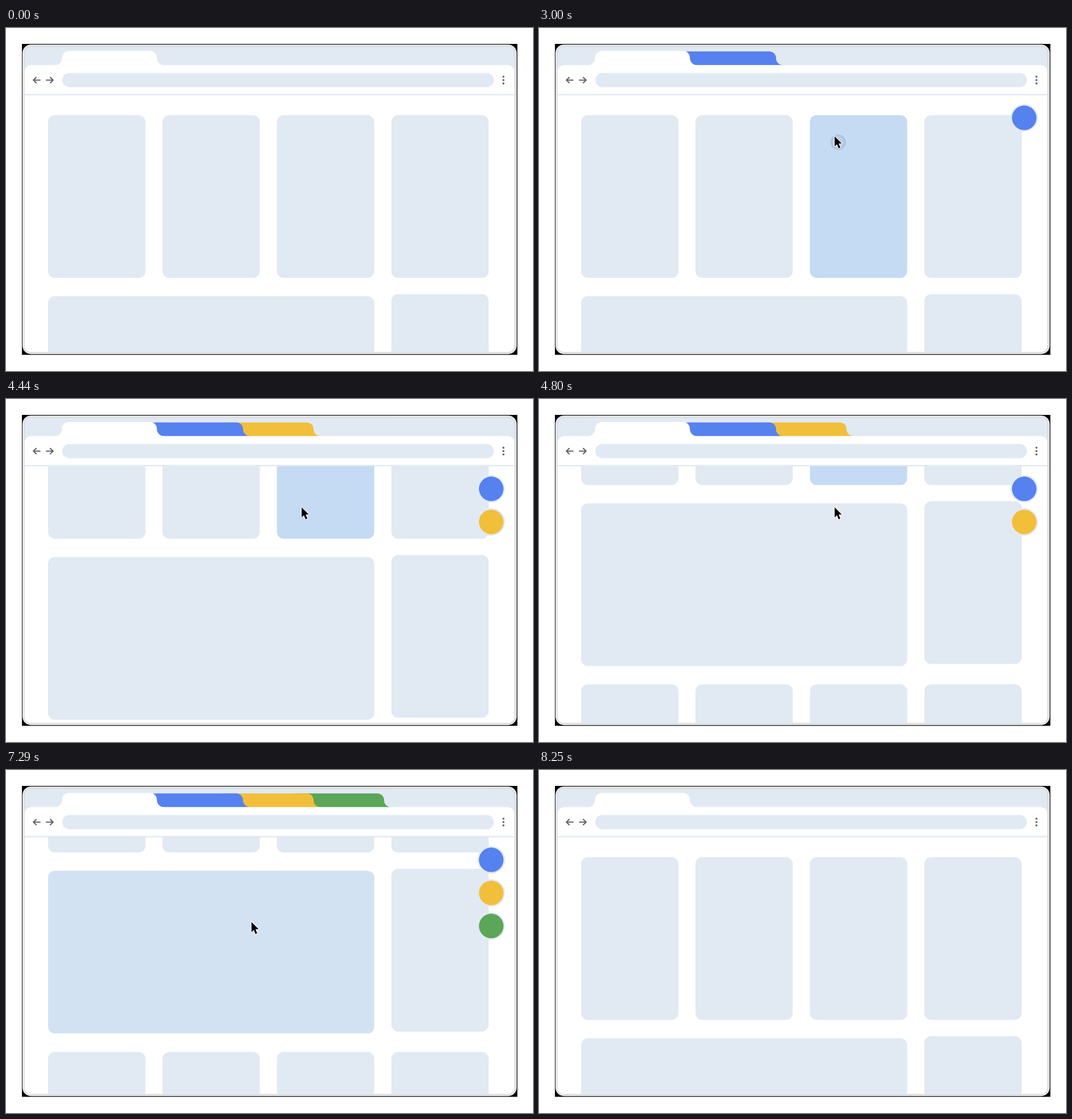
An HTML page with a canvas for the animation above (9 s loop, 927 px wide and 604 px high).

```html
<!DOCTYPE html>
<html lang="en">
<head>
<meta charset="utf-8">
<title>Browser tabs</title>
<style>
html, body { margin: 0; width: 100%; height: 100%; overflow: hidden; background: #fff; }
canvas { display: block; }
</style>
</head>
<body>
<canvas id="stage" width="927" height="604"></canvas>
<script>
const ctx = document.getElementById('stage').getContext('2d');
const LOOP = 9000, STEP = 30;
const PALE = '#e1e9f3', INK = '#5f6368';
const GREY = [225, 233, 243], ACTIVE = [197, 218, 243], SOFT = [211, 226, 243];
const SCROLL = 296.6;
const COLUMNS = [74, 275.2, 476.5, 677.8], CARD_W = 171.2, CARD_H = 286.5;

// click time, tab colour, right edge, hidden offset, tab and circle exit times
const tabs = [
  { click: 1110, color: '#5682ef', right: 417, travel: 152, y: 158.2, close: 7930, leave: 7650 },
  { click: 3000, color: '#f2bf3b', right: 541, travel: 124, y: 216.5, close: 7610, leave: 7470 },
  { click: 5730, color: '#5ba658', right: 665, travel: 124, y: 274.7, close: 7290, leave: 7290 }
];
const moves = [
  { start: 240, end: 900, from: [133, 77], to: [116.3, 179.3] },
  { start: 1890, end: 2700, from: [116.3, 179.3], to: [519.5, 190.3] },
  { start: 5070, end: 5590, from: [519.5, 190.3], to: [431.3, 267.3] }
];

const clamp = v => Math.max(0, Math.min(1, v));
const mix = (a, b, p) => a + (b - a) * p;
const span = (t, start, end) => clamp((t - start) / (end - start));
const blend = (a, b, p) => `rgb(${a.map((v, i) => Math.round(mix(v, b[i], p)))})`;

// cubic-bezier(.25, 0, .25, 1)
function ease(x) {
  let lo = 0, hi = 1;
  for (let i = 0; i < 24; i++) {
    const s = (lo + hi) / 2;
    if (0.75 * s * (1 - s) + s * s * s < x) lo = s; else hi = s;
  }
  return lo * lo * (3 - 2 * lo);
}
const glide = (t, start, end) => ease(span(t, start, end));

function box(x, y, w, h, r, color) {
  ctx.beginPath();
  ctx.roundRect(x, y, w, h, r);
  ctx.fillStyle = color;
  ctx.fill();
}

function disc(x, y, r, color) {
  ctx.beginPath();
  ctx.arc(x, y, r, 0, Math.PI * 2);
  ctx.fillStyle = color;
  ctx.fill();
}

function tabShape(left, right, top, r, color) {
  const base = 66, mid = top + r;
  ctx.beginPath();
  ctx.moveTo(left - r, base);
  ctx.lineTo(left - r, 65.3);
  ctx.arcTo(left, 65.3, left, mid, r);
  ctx.arcTo(left, top, left + r, top, r);
  ctx.arcTo(right, top, right, mid, r);
  ctx.arcTo(right, 65.3, right + r, 65.3, r);
  ctx.lineTo(right + r, base);
  ctx.fillStyle = color;
  ctx.fill();
}

function clipWindow() {
  ctx.beginPath();
  ctx.roundRect(32.6, 33.3, 861.6, 537.2, 11);
  ctx.clip();
}

function drawFrame() {
  ctx.fillStyle = '#fff';
  ctx.fillRect(0, 0, 927, 604);
  ctx.fillStyle = '#000';
  ctx.fillRect(28, 28, 871.5, 547.5);
  box(29, 29.2, 869.2, 545, 15, '#fff');
  box(30, 30.4, 867.2, 542.8, 14, '#dcdcdc');
}

function cardColors(t) {
  const first = t < 1110 ? 0 : 1 - span(t, 1710, 2010);
  const third = t < 3000 ? 0 : 1 - span(t, 5070, 5310);
  let wide = blend(GREY, GREY, 0);
  if (t >= 5730) wide = blend(ACTIVE, SOFT, span(t, 6000, 6300));
  if (t > 7290) wide = blend(SOFT, GREY, span(t, 7290, 7500));
  return { row: [first, 0, third, 0].map(p => blend(GREY, ACTIVE, p)), wide };
}

function drawPage(t) {
  const offset = SCROLL * (glide(t, 4080, 4980) - glide(t, 7260, 8160));
  const colors = cardColors(t);
  ctx.save();
  ctx.fillStyle = '#fff';
  ctx.fillRect(32, 66, 863, 505);
  ctx.translate(0, -offset);
  COLUMNS.forEach((x, i) => {
    box(x, 153.6, CARD_W, CARD_H, 12, colors.row[i]);
    box(x, 791.2, CARD_W, CARD_H, 12, PALE);
  });
  box(74, 472.3, 573.7, CARD_H, 12, colors.wide);
  box(677.8, 468.7, CARD_W, CARD_H, 12, PALE);
  ctx.restore();
}

function drawTabs(t) {
  ctx.fillStyle = PALE;
  ctx.fillRect(32, 33, 863, 50);
  for (const tab of [...tabs].reverse()) {
    const p = glide(t, tab.click + 120, tab.click + 570) - span(t, tab.close, tab.close + 320);
    if (p <= 0) continue;
    const right = tab.right - tab.travel * (1 - p);
    tabShape(right - 167, right, 41.2, 12, tab.color);
  }
  tabShape(98.5, 265.4, 40.2, 12.5, '#fff');
}

function line(...points) {
  ctx.beginPath();
  points.forEach(([x, y]) => ctx.lineTo(x, y));
  ctx.stroke();
}

function drawToolbar() {
  box(32.6, 65.3, 861.6, 51, [12, 12, 0, 0], '#fff');
  box(99, 79.2, 759, 25, 12.5, PALE);
  ctx.fillStyle = PALE;
  ctx.fillRect(32, 116.2, 863, 2.4);
  ctx.strokeStyle = INK;
  ctx.lineWidth = 2.1;
  ctx.lineCap = 'round';
  ctx.lineJoin = 'round';
  line([48.5, 91.7], [59.8, 91.7]);
  line([53, 87], [48.3, 91.7], [53, 96.4]);
  line([71.2, 91.7], [82.6, 91.7]);
  line([78, 87], [82.8, 91.7], [78, 96.4]);
  for (const y of [85.8, 91.7, 97.6]) disc(875, y, 1.8, INK);
}

function drawCircles(t) {
  for (const { click, leave, y, color } of tabs) {
    const p = glide(t, click + 270, click + 840) - glide(t, leave, leave + 540);
    if (p <= 0) continue;
    const x = mix(919, 853.5, p);
    disc(x, y, 24.2, PALE);
    disc(x, y, 21.6, color);
  }
}

function drawCursor(t) {
  if (t < 270 || t >= 7590) return;
  let [x, y] = moves[0].from;
  for (const { start, end, from, to } of moves) {
    if (t < start) break;
    const p = glide(t, start, end);
    x = mix(from[0], to[0], p);
    y = mix(from[1], to[1], p);
  }
  ctx.save();
  ctx.translate(x, y);
  for (const { click } of tabs) {
    const p = (t - click) / 420;
    if (p < 0 || p >= 1) continue;
    const r = mix(12, 21, ease(p)), fade = 1 - p;
    disc(6.8, 11, r + 1.5, `rgba(70,90,120,${0.08 * fade})`);
    ctx.beginPath();
    ctx.arc(6.8, 11, r, 0, Math.PI * 2);
    ctx.strokeStyle = `rgba(70,90,120,${0.1 * fade})`;
    ctx.lineWidth = 3;
    ctx.stroke();
  }
  ctx.globalAlpha = 1 - span(t, 7290, 7590);
  const arrow = new Path2D('M.5 .5V18.2L4.6 14.4L7.5 21.4L10.5 20.1L7.6 13.3L13 13Z');
  ctx.strokeStyle = '#fff';
  ctx.lineWidth = 2;
  ctx.lineJoin = 'round';
  ctx.stroke(arrow);
  ctx.fillStyle = '#000';
  ctx.fill(arrow);
  ctx.restore();
}

function render(t) {
  drawFrame();
  ctx.save();
  clipWindow();
  drawPage(t);
  drawTabs(t);
  drawToolbar();
  drawCircles(t);
  ctx.restore();
  drawCursor(t);
}

const begin = performance.now();
function tick() {
  const t = (performance.now() - begin) % LOOP;
  render(Math.floor(t / STEP) * STEP);
  requestAnimationFrame(tick);
}
tick();
</script>
</body>
</html>
```
